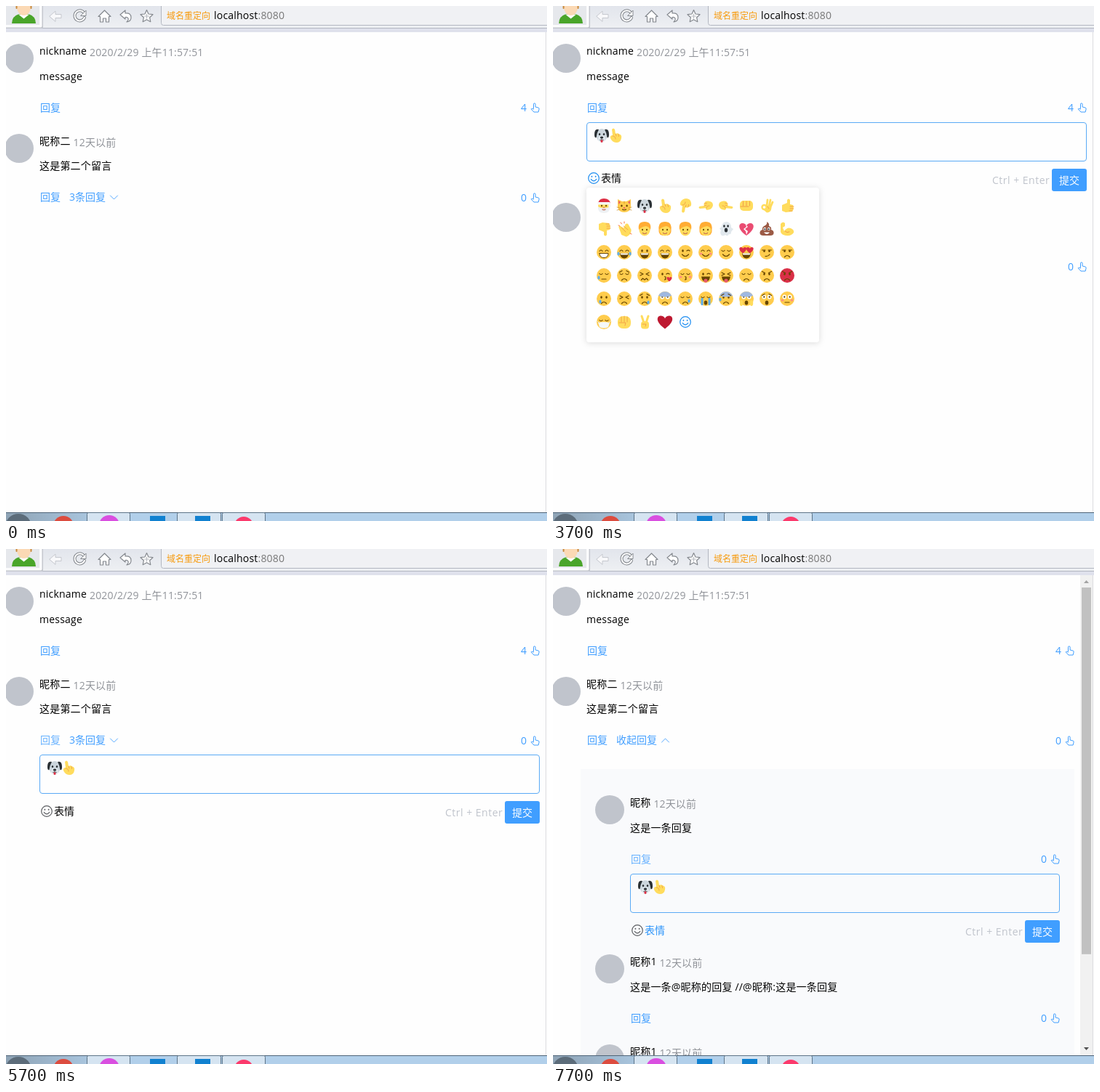
These frames come from a looping animation (744x709 px, 8 s). An HTML page:

```html
<!DOCTYPE html>
<html lang="zh-CN">
<head>
<meta charset="utf-8">
<title>message board</title>
<style>
html, body { margin: 0; width: 100%; height: 100%; overflow: hidden; background: #fefefe; }
svg { display: block; }
#stage { position: absolute; left: 0; top: 0; }
text { font: 14px "Open Sans", "Noto Sans CJK SC", "Noto Sans CJK JP", sans-serif; white-space: pre; }
path { stroke-linecap: round; stroke-linejoin: round; }
.latin { letter-spacing: .2px; }
.date { fill: #909399; letter-spacing: .15px; }
.link { fill: #409eff; }
.link path, .count path { stroke: #409eff; }
.on { fill: #66b1ff; }
.on path { stroke: #66b1ff; }
.count { fill: #409eff; }
.hint { fill: #c0c4cc; }
.pop { filter: drop-shadow(0 1px 4px rgba(0, 0, 0, .14)); }
</style>
</head>
<body>
<svg id="stage" width="744" height="709" viewBox="0 0 744 709"></svg>
<script>
const INK = '#664500', SKIN = '#ffdc5d', SHADE = '#ef9645', TEAR = '#5dadec', RED = '#be1931', BLUE = '#1c8cf0';

const shape = (d, fill = INK, stroke = 'none', w = 1) =>
  `<path d="${d}" fill="${fill}" stroke="${stroke}" stroke-width="${w}"/>`;
const line = (d, color = INK, w = 1.2) => shape(d, 'none', color, w);
const oval = (x, y, rx, ry, fill = INK) =>
  `<ellipse cx="${x}" cy="${y}" rx="${rx}" ry="${ry}" fill="${fill}"/>`;
const pair = (x, y, rx, ry, fill) => oval(-x, y, rx, ry, fill) + oval(x, y, rx, ry, fill);
const box = (x, y, w, h, fill, r = 0, more = '') =>
  `<rect x="${x}" y="${y}" width="${w}" height="${h}" rx="${r}" fill="${fill}" ${more}/>`;
const at = (x, y, body, more = '') => `<g transform="translate(${x} ${y}) ${more}">${body}</g>`;
const text = (x, y, s, more = '') => `<text x="${x}" y="${y}" ${more}>${s}</text>`;

// ---- emoji, drawn around 0,0 with radius 10 ----
const heart = (x, y, s, fill) =>
  at(x, y, shape('M0 9C-13 0-11-8-5.5-8Q-1.5-8 0-4.5 1.5-8 5.5-8C11-8 13 0 0 9z', fill), `scale(${s})`);
const drop = (x, y) => oval(x, y, 1.7, 2.6, TEAR);

const eye = {
  dot: pair(3.5, -2, 1.3, 1.8),
  up: line('M-6-1.5q2-3 4 0M2-1.5q2-3 4 0'),
  down: line('M-6-2.5q2 2.5 4 0M2-2.5q2 2.5 4 0'),
  wink: oval(-3.5, -2, 1.3, 1.8) + line('M2-2q2-1.8 4 0'),
  squint: line('M-6-4l4 2-4 2M6-4l-4 2 4 2'),
  love: heart(-4.8, -3, .5, '#dd2e44') + heart(4.8, -3, .5, '#dd2e44'),
  wide: pair(3.7, -2.5, 2.8, 3, '#fff') + pair(3.7, -2.5, 1.1, 1.2),
  side: pair(3.5, -1.5, 1.3, 1.4) + line('M-6.5-3h4.5M2-3h4.5')
};
const mouth = {
  smile: line('M-4.5 3q4.5 5 9 0'),
  open: shape('M-6 1.5h12q-1 7-6 7t-6-7z') + shape('M-5.4 1.5h10.8l-.8 2h-9.2z', '#fff'),
  teeth: shape('M-6 1.5h12q0 6-6 6t-6-6z', '#fff', INK),
  frown: line('M-3.5 6.5q3.5-4 7 0'),
  flat: line('M-3 5h6'),
  smirk: line('M-2 5.5q4 .5 6-2.5'),
  kiss: line('M-.5 1.5q3 .5 .8 2.2q2.2 1.6-.8 2.2'),
  tongue: shape('M-6 1.5h12q-1 7-6 7t-6-7z') + oval(0, 7, 2.6, 2.6, '#e8596e'),
  wavy: line('M-4.5 6l2-2 2.5 2 2.5-2 2 2'),
  gape: oval(0, 5.5, 2.3, 3)
};
const blush = pair(6.5, 2, 2, 1.5, '#ff8f7f');
const angry = line('M-6.5-5.5l4 2M6.5-5.5l-4 2');
const worry = line('M-6.5-4.5l3.5-2M6.5-4.5l-3.5-2');
const cool = shape('M-9-4A10 10 0 0 1 9-4Q0-1-9-4z', '#9fb8e0');
const face = (e, m, extra = '', skin = '#ffcc4d') => oval(0, 0, 10, 10, skin) + eye[e] + mouth[m] + extra;

const point = shape('M-5-8Q-3-11-1-8L0-2Q3-3.5 5-1.5 9-1 8 4 7 10 1 10-5 9.500-7 4-8 0-4 0z', SKIN) +
  line('M0-2l1 3M4-1.5l.5 3M-4 1q4 0 4 4', SHADE, .8);
const fist = box(-9, -7, 18, 14, SKIN, 5) + line('M-4.5-6v6M0-6v6M4.5-6v6M-8 1h11', SHADE, .9);
const thumb = shape('M-7-1L0-4 0-8Q2-11 4-8L4-2 8-1Q10 4 7 8L-2 9-7 7z', SKIN) +
  line('M4 1h5M4 4h4.5M3 7h4', SHADE, .8);
const palm = shape('M-8 3L-5-8Q-3-10-2-7L0-3 5-6Q8-6 8-3L7 5Q3 11-4 9z', SKIN);
const person = (hair, long) => (long ? box(-8.5, -8, 17, 17, hair, 6) : '') + oval(0, 1, 7.6, 8.5, SKIN) +
  shape('M-8 1Q-10-10 0-10T8 1Q6-3 2-4-5-3-8 1z', hair) + pair(3, 1, 1, 1.3) + line('M-2.5 5.5q2.5 2 5 0', '#c1694f');
const dog = oval(0, 0, 7.8, 9, '#ccd6dd') + oval(0, 5, 5.2, 4.2, '#e1e8ed') +
  shape('M-4-8Q-10-10-10-1-10 4-7.5 3-7-3-4-8zM4-8Q10-10 10-1 10 4 7.5 3 7-3 4-8z', '#292f33') +
  pair(3, -1.5, 1.2, 1.5, '#292f33') + oval(0, 8, 1.6, 1.9, '#dd2e44') + oval(0, 3, 2.2, 1.5, '#292f33') +
  line('M0 4v1.5M-2.5 6.5q2.5 0 2.5-1 0 1 2.5 1', '#292f33', .6);
const cat = shape('M-9-9L-3-6H3L9-9V2Q8 9 0 9T-9 2z', '#ffcc4d') + shape('M-8-7l3 2-2.5 3zM8-7l-3 2 2.5 3z', '#e75a70') +
  pair(3.6, 0, 1.2, 1.6) + oval(0, 3, 1.4, 1, '#e75a70') + line('M-2.5 5q2.5 1.5 5 0') +
  line('M-10 2l4 1M-10 6l4-1M10 2l-4 1M10 6l-4-1M0-6v3', '#c78b2a', .7);
const santa = oval(0, 1, 8, 8.5, SKIN) + shape('M-8 1Q-9 10 0 10T8 1Q4 4 0 2.5-4 4-8 1z', '#eef1f4') +
  shape('M-8-3Q-7-10 0-10 8-10 9-3z', '#dd2e44') + box(-9, -5, 18, 3.4, '#f5f8fa', 1.7) + oval(8, 0, 2, 2, '#f5f8fa') +
  pair(3, 0, 1, 1.2) + oval(0, 2.5, 1.5, 1, '#e8906a') + line('M-2 5q2 1.5 4 0', '#c1694f');
const ghost = shape('M-6 9Q-9 6-7 2L-9-1Q-6-2-6-4-5-10 1-10 7-9 7-2L10 0 7 4Q7 8 4 7 2 11-1 8-3 10-6 9z', '#e1e8ed') +
  pair(2.6, -4, 1.3, 1.7, '#292f33') + oval(0, 1.5, 2.2, 3, '#292f33');
const broken = heart(0, 0, 1, '#ea4c72') + shape('M-1-6L2-3-2 0 2 3 0 8-1 3-4 0 0-3z', '#fff');
const poop = shape('M0-10Q4-8 3-4 7-3 6 1 10 2 9.5 6 9 9 5 9H-5Q-9 9-9.5 6-10 2-6 1-7-3-2-5 1-7 0-10z', '#9b5a45') +
  pair(2.8, 0, 1.8, 2.2, '#fff') + pair(2.6, .3, .9, 1.2, '#292f33') + shape('M-4 4.5h8q-4 5-8 0z', '#fff');
const muscle = shape('M-9-7Q-6-11-3-8L-3-4-6-2-4 3Q0-3 5-1 10 1 9 5 6 10-2 9-8 8-9 4z', SKIN) + line('M-3 3q3 3 6 1', SHADE, .9);
const ok = line('M0 0L1-8M3 1L5-8M5 2L8-5', SKIN, 2.8) + shape('M-1 0Q6-2 6.5 3 6 9 0 9.5L-4 6z', SKIN) +
  `<circle cx="-3.5" cy="2" r="3" fill="#fff" stroke="${SKIN}" stroke-width="2.4"/>` + line('M1 1l2 3', SHADE, .8);
const clap = at(1, 1, palm, 'rotate(-35)') + line('M-8-5l2 1M-5-9l1.5 2M0-10v2M8 6l2 1', '#fa743e', 1) +
  line('M-4-2l6 6M-1-4l6 5', SHADE, .8);
const victory = line('M-1 1L-4-8M2 1L5-8', SKIN, 3) + box(-5, -1, 11, 10.5, SKIN, 4) + line('M-3 3h5l-1 3', SHADE, .8);
const smiley = `<g class="smiley" fill="none" stroke="${BLUE}" stroke-width="1.2"><circle r="7.3"/>` +
  '<path d="M-2.6-2.4v.4M2.6-2.4v.4" stroke-width="1.7"/><path d="M-3.8 1.4q3.8 5 7.6 0"/></g>';

const emoji = [
  santa, cat, dog, point, at(0, 0, point, 'scale(1 -1)'), at(0, 0, point, 'rotate(-90) scale(.8 1)'),
  at(0, 0, point, 'rotate(90) scale(-.8 1)'), fist, ok, thumb,
  at(0, 0, thumb, 'scale(1 -1)'), clap, person('#ffac33'), person('#ffac33', 1), person('#ffac33'), person('#ffac33', 1),
  ghost, broken, poop, muscle,
  face('up', 'teeth'), face('up', 'open', drop(-8, 2) + drop(8, 2)), face('dot', 'open'), face('up', 'open'), face('wink', 'smile'),
  face('up', 'smile', blush), face('down', 'smile'), face('love', 'open'), face('side', 'smirk'), face('side', 'frown'),
  face('down', 'flat', drop(-7, 3)), face('down', 'frown', worry), face('squint', 'wavy'),
  face('wink', 'kiss', heart(6, 5, .36, '#dd2e44')), face('down', 'kiss', blush), face('wink', 'tongue'),
  face('squint', 'tongue'), face('down', 'frown'), face('dot', 'frown', angry), face('dot', 'frown', angry, '#da2f47'),
  face('dot', 'frown', drop(-5, 4)), face('squint', 'frown'), face('dot', 'frown', worry + drop(5, 5)),
  face('wide', 'frown', cool), face('down', 'frown', drop(5, 3)),
  face('down', 'gape', box(-6.5, -1, 3, 10, TEAR, 1) + box(3.5, -1, 3, 10, TEAR, 1)),
  face('dot', 'frown', cool + worry + drop(-8, 1)),
  face('wide', 'gape', cool + pair(7, 6, 2.2, 4, SKIN)), face('wide', 'gape', worry), face('wide', 'flat', blush),
  face('down', 'flat', shape('M-8 1Q0-1 8 1L6 7Q0 10-6 7z', '#f5f8fa') + line('M-9-1l2 2M9-1l-2 2', '#e1e8ed', 1)),
  box(-9, -8, 18, 17, SKIN, 7) + line('M-4-7v7M0-8v8M4-7v7M-7 1h9l-1 4', SHADE, .8), victory, heart(0, 0, 1.05, RED), smiley
];

// ---- page parts ----
const hand = shape('M4.5 8V2.2a1.3 1.3 0 0 1 2.6 0V6l4 1q1.4 .4 1 2l-1 4H5L1.2 8.8Q2.5 7 4.5 9', 'none', 'currentColor');

const item = (id, name, msg, date, count, up = 0) =>
  oval(0, 0, 20, 20, '#c0c4cc') +
  `<text x="28" y="-5" class="latin">${name}<tspan dx="4" dy="2" class="date">${date}</tspan></text>` +
  text(28, 30 - up, msg, 'class="latin"') +
  text(29, 73 - up, '回复', `class="link" id="${id}"`) +
  `<g class="count side">${text(-26, 73, count)}${at(-13, 61, hand)}</g>`;

const ago = '12天以前';
const replies = [
  ['昵称', '这是一条回复'],
  ['昵称1', '这是一条@昵称的回复 //@昵称:这是一条回复'],
  ['昵称1', '这是一条回复']
].map(([name, msg], i) => `<g id="r${i}">${item('link' + i, name, msg, ago, 0)}</g>`).join('');

const toggle = '<g id="toggle" class="link"><text id="fold" x="87" y="268"></text>' +
  '<path id="chev" fill="none" stroke-width=".9"/></g>';

const editor = '<g id="editor">' +
  '<rect id="area" x=".5" y=".5" height="53" rx="3.5" fill="none"/>' +
  text(11, 23, 'placeholder', 'id="hint" class="hint latin"') + box(11, 8, 1, 19, '#000', 0, 'id="caret"') +
  `<g id="dog">${at(21, 18, dog)}</g><g id="finger">${at(40, 18, point)}</g>` +
  `<g id="foot">${at(10, 0, smiley)}${text(20, 5, '表情', 'id="label"')}</g>` +
  '<g id="send">' + text(-130, 85, 'Ctrl + Enter', 'class="hint" letter-spacing=".5"') +
  box(-48, 64, 48, 31, '#409eff', 3, 'id="button"') + text(-38, 85, '提交', 'fill="#fff"') + '</g></g>';

const picker = '<g id="picker">' + box(46, 250, 320, 213, '#fff', 4, 'class="pop"') +
  emoji.map((e, i) => at(70 + i % 10 * 28, 275 + Math.floor(i / 10) * 32, e)).join('') + '</g>';

const scroll = '<g id="bar">' + box(725, 36, 17, 661, '#f1f1f1') + box(727, 53, 13, 517, '#c1c1c1', 0, 'id="grip"') +
  shape('M730 47l3.5-4 3.5 4z', '#a3a3a3') + shape('M730 686l3.5 4 3.5-4z', '#505050') + '</g>';

const grad = (id, a, b, down, end = 1) => `<linearGradient id="${id}" x2="${down ? 0 : 1}" y2="${down ? 1 : 0}">` +
  `<stop stop-color="${a}"/><stop offset="${end}" stop-color="${b}"/></linearGradient>`;
const GREY = '#85898f';
const nav =
  shape('M60 14l8-7v4.5h8v5h-8v4.5z', '#f8f8fa', '#c6c9cf') +
  line('M107 9a7 7 0 1 0 1 7', GREY, 4) + line('M107 9a7 7 0 1 0 1 7', '#fff', 2) + shape('M103 13.5h7V6.5z', '#fff', GREY) +
  shape('M127 14.5l8.5-8.5 8.5 8.5h-2.5V22h-4v-5h-4v5h-4v-7.5z', '#fff', GREY, 1.2) +
  shape('M157 12l7-6v4q8-1 8 6 0 5-6 6 3-3 2-5-1-2-4-1.5V18z', '#fff', GREY, 1.2) +
  shape('M193.5 5.5l2.5 5.5 6 .7-4.400 4 1.2 6-5.3-3-5.3 3 1.2-6-4.4-4 6-.7z', '#fff', GREY, 1.2) +
  line('M193.5 11v6M190.5 14h6', '#b9bcc2');
const user = box(-4, -4, 55, 35, '#c4c7ce', 2) + box(-4, -4, 53.5, 33.5, '#fbfbfc', 2) + box(-4, -4, 50, 30, '#e6e8ec') +
  shape('M8 24Q8 14 18 11H31Q41 14 41 24z', '#4aa52a') + shape('M17 11.5l7.5 6 7.5-6z', '#fff') +
  oval(24.5, 2, 9.5, 11, '#fbd9b5') + line('M14.5 0v3M34.5 0v3', '#c98a3c', 2);
const chrome = box(0, 0, 744, 31, 'url(#tool)') + box(0, 30, 744, 1, '#b4b8c2') + box(0, 31, 744, 5, '#dfe1ec') +
  user + nav + box(213.5, -6.5, 540, 33, '#f0f1f4', 3, 'stroke="#b3b7c1"') +
  text(221, 18, '域名重定向', 'fill="#f79a0c" style="font-size:12px"') +
  text(286, 18, 'localhost<tspan fill="#777">:8080</tspan>', 'class="latin"');

const tab = (x, w) => box(x + .5, 697.5, w, 20, '#d5e4f1', 2, 'stroke="#5d7488"');
const taskbar = box(0, 697, 744, 12, 'url(#task)') + box(0, 697, 744, 1, '#4f6478') +
  oval(17, 717, 18, 18, '#5c6c7a') + oval(79, 716, 14, 14, '#dc4c3f') +
  tab(111, 59) + oval(142, 715, 14, 14, '#d94fe0') + box(198, 702, 21, 12, '#1181d0') +
  tab(235, 60) + box(260, 702, 21, 12, '#1181d0') + tab(297, 59) + oval(327, 716, 13, 13, '#fb3a6c');

document.getElementById('stage').innerHTML =
  `<defs>${grad('tool', '#e2e5ec', '#eef0f3', true)}${grad('task', '#8ea3b5', '#b1cfea', false, .2)}</defs>` +
  box(0, 0, 744, 709, '#fefefe') + box(742, 36, 1, 661, '#dcdcdf') +
  at(18, 72, item('replyA', 'nickname', 'message', '2020/2/29 上午11:57:51', 4)) +
  '<g id="second">' + at(18, 196, item('replyB', '昵称二', '这是第二个留言', ago, 0, 1)) + toggle + '</g>' +
  `<svg id="panel" x="38"><rect width="100%" height="100%" fill="#f9fafc"/>${replies}</svg>` +
  editor + picker + scroll + chrome + taskbar;

// ---- timeline ----
const $ = id => document.getElementById(id);
const set = (id, key, val) => $(id).setAttribute(key, val);
const move = (node, x, y) => node.setAttribute('transform', `translate(${x} ${y})`);
const show = (id, on) => { $(id).style.display = on ? '' : 'none'; };
const light = (id, on) => $(id).classList.toggle('on', on);
const faceIcon = document.querySelector('#foot .smiley');
const sides = document.querySelectorAll('.side');
const FULL = 459, SHIFT = 95;

function draw(t) {
  const within = (a, b = 8000) => t >= a && t < b;
  const first = within(1000, 5400), nested = within(7600), open = within(2000, 4100);
  const p = Math.min(1, Math.max(0, (t - 6745) / 300));
  const height = FULL * (1 - Math.cos(Math.PI * p)) / 2;
  const scrolls = height > 299, right = scrolls ? 717 : 734;

  move($('second'), 0, first ? SHIFT : 0);
  sides.forEach(g => move(g, right - (g.closest('#panel') ? 98 : 18), 0));

  light('replyA', within(600, 1800));
  light('replyB', within(5100, 6800));
  light('link0', within(7400));
  light('toggle', within(4800, 5100) || within(6000, 7400));
  const folded = t < 6800;
  $('fold').textContent = folded ? '3条回复' : '收起回复';
  set('chev', 'd', folded ? 'M143.5 261l5 5 5-5' : 'M149.5 266l5-5 5 5');

  show('panel', height > 0);
  set('panel', 'y', nested ? 303 : 398);
  set('panel', 'width', right - 38);
  set('panel', 'height', height + (nested ? SHIFT : 0));
  for (let i = 0; i < 3; i++) move($('r' + i), 40, 56 + 124 * i + (nested && i ? SHIFT : 0));

  show('bar', scrolls);
  set('grip', 'height', 627 * 661 / (362 + height));

  show('editor', t >= 1000);
  const [x, y] = first ? [46, 160] : nested ? [106, 447] : [46, 283];
  const w = right - x - (nested ? 20 : 0);
  move($('editor'), x, y);
  move($('foot'), 0, first ? 77 : 78);
  move($('send'), w, 0);
  set('area', 'width', w - 1);
  set('area', 'stroke', t < 2000 ? '#dcdfe6' : '#5aaaf5');
  set('button', 'fill', t < 2800 ? '#66b1ff' : t < 2900 ? '#53a7ff' : '#409eff');
  set('label', 'fill', within(1500, 2000) || within(5400, 5700) || within(6800) ? '#2a93fa' : '#000');
  faceIcon.setAttribute('stroke', open ? BLUE : '#5c5e62');
  show('hint', t < 2800);
  show('caret', within(2000, 2400));
  show('dog', t >= 2800);
  show('finger', t >= 3200);
  show('picker', open);
}

const start = performance.now();
function tick() {
  const t = (performance.now() - start) % 8000;
  draw(Math.floor(t / 100) * 100);
  requestAnimationFrame(tick);
}
tick();
</script>
</body>
</html>
```
